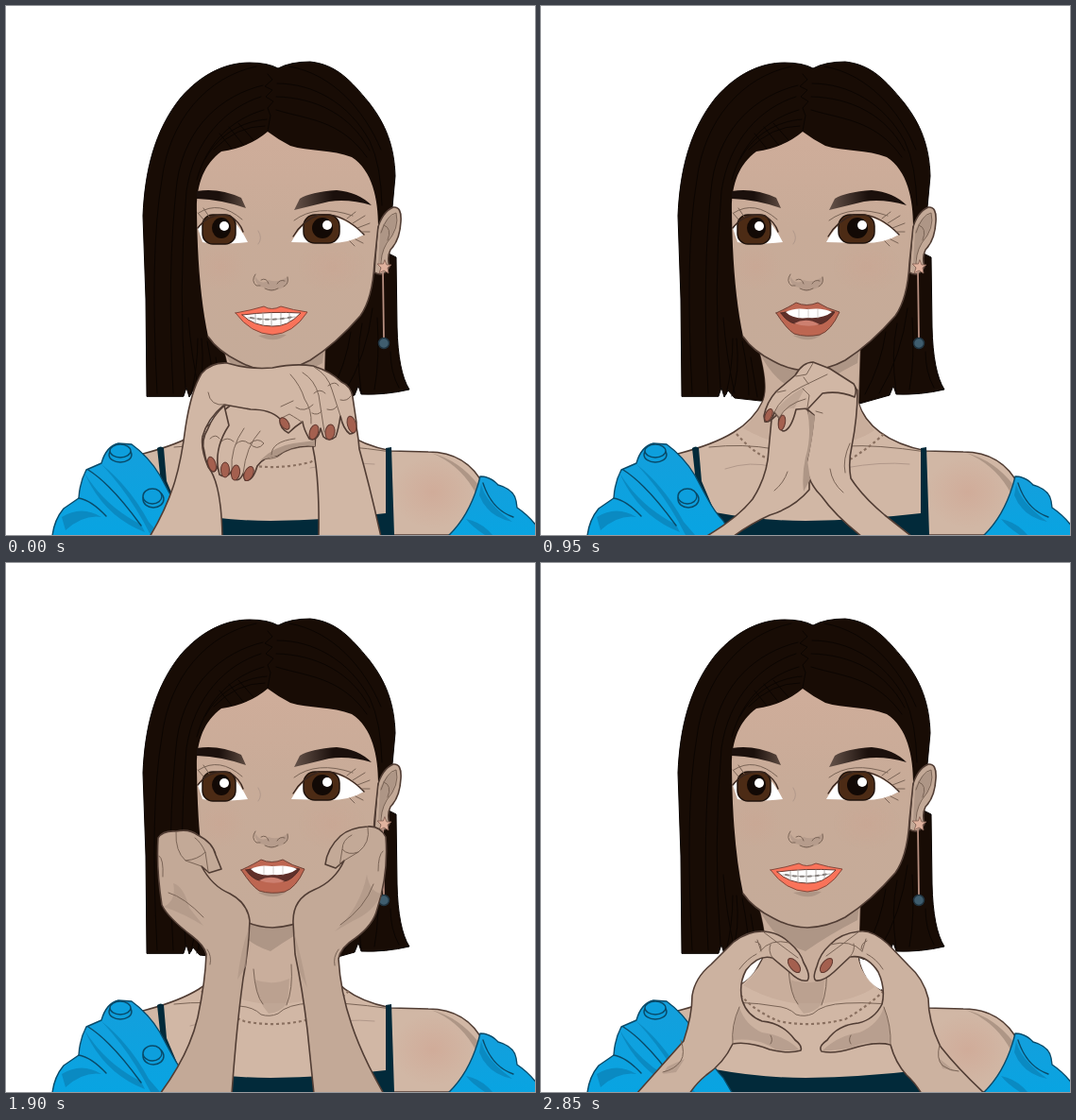
These frames come from a looping animation (560x560 px, 3800 ms). An HTML page:

```html
<!DOCTYPE html>
<html lang="en">
<head>
<meta charset="utf-8">
<title>Portrait poses</title>
<style>
html, body { margin: 0; width: 100%; height: 100%; overflow: hidden; background: #fff; }
svg { display: block; width: 100vw; height: 100vh; }
.pose { animation: quarter 3.8s step-end infinite; }
.mouth { animation: half 3.8s step-end infinite; }
.p2 { animation-delay: -2.85s; }
.p3 { animation-delay: -1.9s; }
.p4, .smile { animation-delay: -.95s; }
.talk { animation-delay: -2.85s; }
@keyframes quarter { 0% { visibility: visible } 25%, 100% { visibility: hidden } }
@keyframes half { 0% { visibility: visible } 50%, 100% { visibility: hidden } }
path, circle, ellipse { stroke-linejoin: round; stroke-linecap: round; }
.ink { stroke: #513d34; stroke-width: 1.6; }
.fine { fill: none; stroke: #7a6456; stroke-width: 1; }
.soft { fill: none; stroke: #b1988a; stroke-width: 1; }
.shade { fill: #ae9686; }
.light { fill: #d1b7a5; }
.mid { fill: #c3a997; }
.warm { fill: #ccb2a0; }
.nail { fill: #a4604f; stroke: #60382f; stroke-width: 1; }
.chain { fill: none; stroke: #8a7060; stroke-width: 2.2; stroke-dasharray: 3 3; stroke-linecap: butt; }
.strand { fill: none; stroke: #0b0502; stroke-width: 1; }
.cloth { stroke: #094a69; stroke-width: 1.4; }
.fold { fill: #0a8ac2; }
.top { fill: #022a3a; }
</style>
</head>
<body>
<svg viewBox="0 0 560 560">
<defs>
  <linearGradient id="skin" x2="0" y2="1">
    <stop offset="0" stop-color="#cfad9a"/><stop offset=".4" stop-color="#c8ab98"/><stop offset="1" stop-color="#c5ab99"/>
  </linearGradient>
  <linearGradient id="blue" x2="0" y2="1">
    <stop offset="0" stop-color="#149fdc"/><stop offset="1" stop-color="#08a4e2"/>
  </linearGradient>
  <linearGradient id="browL"><stop offset=".45" stop-color="#1b100c"/><stop offset="1" stop-color="#5d4a40"/></linearGradient>
  <linearGradient id="browR"><stop offset="0" stop-color="#66534a"/><stop offset=".5" stop-color="#1b100c"/></linearGradient>
  <radialGradient id="blush"><stop offset="0" stop-color="#cf9b88" stop-opacity=".4"/><stop offset="1" stop-color="#cf9b88" stop-opacity="0"/></radialGradient>
</defs>

<!-- hair -->
<path fill="#180c05" stroke="#0b0502" d="M149 413L148 310L145 222C147 175 157 132 185 97C207 72 232 60 258 60Q277 60 288 66Q301 59 322 59C350 62 365 79 384 102C402 125 411 148 412 180L409 213L405 262L413 266L414 340Q415 387 427 406Q402 412 376 411L373 402L369 412L337 421L232 418L205 415L198 407L194 414L191 404L188 413Z"/>
<g class="strand">
  <path d="M277 72l5 6-8 7 8 4-7 7 8 5-6 7 3 8-3 16"/>
  <path d="M272 84C230 94 190 126 181 186Q170 280 177 410M270 96C232 108 199 142 191 196Q182 300 190 404"/>
  <path d="M265 64C213 75 173 120 165 184Q152 260 160 410M273 110C241 119 213 143 202 184"/>
  <path d="M287 82C326 82 363 103 385 143Q397 168 398 211M286 96C328 97 365 115 385 153M286 110C318 120 354 120 382 160"/>
  <path d="M300 64C346 72 379 110 397 152M276 120C250 122 225 136 211 162M274 127Q244 127 220 152M236 128l16 20M246 124l16 18M226 135l13 16"/>
  <path d="M203 352Q203 382 196 411M207 352Q211 388 202 413M213 355Q220 390 220 412M193 330Q196 370 205 410M222 372l7 42"/>
  <path d="M388 320Q382 370 358 410M393 330Q396 374 390 406M365 345Q360 380 343 411M407 366Q407 388 416 404M377 336Q370 368 376 408"/>
</g>

<!-- neck and shoulders -->
<path class="light ink" d="M229 358C238 385 240 405 235 418C222 445 195 461 145 474L170 560H490L506 508C494 484 475 472 447 472L408 471C366 463 343 443 336 420L338 354Z"/>
<ellipse cx="452" cy="515" rx="44" ry="38" fill="url(#blush)"/>
<path fill="#c9ae9c" d="M230 360C238 390 240 407 235 419Q228 436 214 447Q240 462 268 466H300Q335 462 353 449Q340 437 336 420L338 355Z"/>
<path class="shade" d="M230 362Q249 381 280 387Q312 384 337 361L335 378Q304 394 280 411Q252 403 235 374Z"/>
<path class="shade" opacity=".5" d="M263 441Q266 464 278 477Q289 477 298 466L300 440Q282 448 263 441Z"/>
<path class="shade" d="M450 473Q480 481 500 507L498 517Q482 486 450 473Z"/>
<path class="fine" d="M178 467Q214 463 247 469Q262 470 270 478Q279 481 288 477Q298 467 323 466Q354 464 408 472M262 430q2 28 10 37M302 425q2 26-5 43"/>
<path class="soft" d="M195 490Q222 481 246 488M322 489Q360 482 390 485"/>
<path class="chain" d="M207 453Q226 475 252 485Q285 492 322 483Q345 470 364 452"/>
<path class="top" d="M160 468Q164 465 167 468L170 503L184 536Q232 545 280 545Q342 544 402 537L402 468L408 467L411 560H170Z"/>

<!-- jacket -->
<g class="cloth" fill="url(#blue)">
  <path d="M49 561Q51 544 61 532L77 521Q78 504 85 491L101 484Q106 466 119 463L133 464Q151 477 163 497L176 521Q184 536 193 545L203 562Z"/>
  <path d="M502 498Q513 498 521 507Q538 512 540 524L541 531Q553 539 562 551V562H467Q492 539 502 498Z"/>
</g>
<g class="fold">
  <path d="M83 494Q104 529 143 549L147 557Q103 540 83 494Z"/>
  <path d="M101 485Q131 509 151 546L163 560H153Q132 518 101 485Z"/>
  <path d="M59 541Q80 528 101 541Q82 538 63 555ZM503 506Q507 525 536 546Q510 541 501 518ZM487 543Q503 546 515 560H507Q493 551 487 543Z"/>
</g>
<g class="cloth" fill="#0d9fdd">
  <path d="M87 491Q111 506 143 550M505 505Q514 533 537 541M77 521Q90 523 106 540" fill="none"/>
  <ellipse cx="121" cy="475" rx="12" ry="8"/><ellipse cx="121" cy="471" rx="11" ry="7"/>
  <ellipse cx="156" cy="522" rx="11" ry="9"/><ellipse cx="155" cy="519" rx="10" ry="8"/>
</g>

<!-- ear -->
<path class="mid ink" d="M393 237Q398 218 410 213Q419 212 418 228Q417 248 407 258Q403 266 406 276Q400 288 390 282Z"/>
<path class="shade" d="M396 238Q403 222 413 220Q415 238 402 251L394 276Z"/>
<path class="fine" d="M397 240Q403 221 413 219Q417 235 403 251Q396 263 397 278M400 232q9 3 4 16"/>

<!-- face -->
<path fill="url(#skin)" d="M277 133Q257 150 228 154C209 168 201 190 202 219Q203 299 214 350Q224 365 246 376Q264 386 282 386Q304 385 322 375Q350 357 375 328Q388 310 390 272L394 233C394 205 388 174 366 160C346 152 320 154 301 148Q289 142 277 133Z"/>
<path fill="none" class="ink" d="M214 350Q224 365 246 376Q264 386 282 386Q304 385 322 375Q350 357 375 328Q388 310 390 272L394 233"/>
<g fill="url(#blush)" opacity=".5">
  <ellipse cx="227" cy="276" rx="27" ry="25"/><ellipse cx="345" cy="276" rx="36" ry="27"/>
</g>
<path class="shade" d="M267 349Q281 346 297 348Q284 358 267 349Z"/>
<path fill="url(#browL)" d="M202 196Q225 192 249 203L254 214Q229 205 202 204Z"/>
<path fill="url(#browR)" d="M305 216L311 204Q322 197 350 195Q373 197 387 211Q363 204 342 207Z"/>

<!-- eyes -->
<path fill="#fff" d="M203 235Q217 219 236 223Q247 232 256 250Q225 253 208 250ZM302 250Q314 228 330 222Q354 219 379 242Q364 251 342 251Z"/>
<g stroke="#20130c" stroke-width="1.5" fill="#4c2b15">
  <rect x="208" y="221" width="35" height="31" rx="11"/>
  <rect x="315" y="221" width="38" height="30" rx="12"/>
</g>
<g fill="#120905">
  <ellipse cx="228" cy="235" rx="10" ry="11"/><ellipse cx="335" cy="235" rx="11" ry="11"/>
</g>
<circle cx="231" cy="233" r="5" fill="#fff"/><circle cx="340" cy="232" r="5" fill="#fff"/>
<path fill="none" stroke="#38251d" stroke-width="1.4" d="M203 235Q216 218 237 222Q248 229 251 239M304 244Q314 227 331 221Q356 218 379 242"/>
<path class="fine" d="M204 219Q226 205 250 226M305 227Q329 209 367 222M209 226l-6-7M215 223l-6-9M361 225l9-7M367 230l13-8M372 235l13-5M376 239l9 0M370 247l8 4M364 249l5 5"/>
<path class="soft" d="M267 238q5 8 0 14"/>

<!-- nose -->
<path class="shade" d="M263 285Q270 297 278 290Q288 294 299 286Q298 299 287 300Q280 305 274 298Q264 298 263 285Z" opacity=".65"/>
<path class="fine" d="M264 284Q259 291 265 296L269 296M270 290q6-3 8 4M287 294q3-5 8-3M298 287q2 7-4 10M274 299q7 4 14 0"/>

<g class="mouth smile">
  <path fill="#fa735a" stroke="#86483a" d="M243 325Q260 322 273 318Q281 323 291 318Q304 322 319 324Q304 347 282 348Q259 347 243 325Z"/>
  <path fill="#fff" stroke="#68372e" d="M250 327Q281 323 312 325Q298 340 282 339Q262 339 250 327Z"/>
  <path fill="none" stroke="#a7a3a0" stroke-width=".9" d="M256 330Q281 334 306 329M264 326v10M272 325v13M281 325v14M291 325v13M300 325v9"/>
  <path fill="none" stroke="#87817e" stroke-width="2" stroke-dasharray="3 5" d="M259 330Q281 334 304 329"/>
</g>
<g class="mouth talk">
  <path fill="#bd6651" stroke="#6f4034" d="M249 325Q264 318 270 314Q281 319 293 314Q302 320 316 324Q307 344 295 348Q281 351 268 347Q260 342 249 325Z"/>
  <path fill="#5f302a" stroke="#502b25" d="M254 325Q281 318 311 324Q303 336 294 337Q281 333 268 336Q260 334 254 325Z"/>
  <path fill="#fff" d="M259 324Q268 319 282 321Q299 319 308 324Q299 331 283 330Q267 332 259 324Z"/>
  <path fill="none" stroke="#c8c1bd" stroke-width=".8" d="M273 321v9M283 321v9M293 321v9"/>
  <path fill="#cd8070" d="M268 336Q281 329 295 337Q282 341 268 336Z"/>
</g>

<!-- earring -->
<path fill="#e0b29e" stroke="#805f52" stroke-width=".8" d="M401 269l2 5 5 0-4 3 1 6-5-3-5 3 2-6-4-4h6Z"/>
<path d="M399 282l1 70" stroke="#b58d7e" stroke-width="1.8"/>
<circle cx="400" cy="357" r="5.5" fill="#3f5d6e" stroke="#20333f" stroke-width="1.5"/>

<!-- chin on stacked hands -->
<g class="pose p1">
  <path class="light ink" d="M397 562Q386 512 374 469Q371 429 355 401L322 425L325 468Q332 500 331 562Z"/>
  <path class="light ink" d="M240 421Q224 432 216 446Q205 459 210 472Q213 485 217 492Q222 494 224 487L226 496Q234 501 239 492L240 500Q247 505 251 495L253 502Q261 504 266 487Q273 477 287 476Q303 464 327 466L329 436Q286 416 240 421Z"/>
  <path class="shade" d="M269 481Q284 466 304 463L327 460V466Q305 463 287 476Z"/>
  <path class="fine" d="M224 487Q221 465 235 444M239 492Q237 468 252 447M251 495Q254 466 269 450M216 458q6-6 10 0M228 461q6-6 13 0M243 464q7-7 14-1M258 463q9-7 15 0-7 9-15 0M281 475q0-14 25-17"/>
  <g class="nail">
    <ellipse cx="218" cy="485" rx="4" ry="8" transform="rotate(-17 218 485)"/>
    <ellipse cx="232" cy="491" rx="4.5" ry="8"/>
    <ellipse cx="243" cy="494" rx="4.5" ry="8" transform="rotate(8 243 494)"/>
    <ellipse cx="257" cy="495" rx="4.5" ry="8" transform="rotate(24 257 495)"/>
  </g>
  <path class="light ink" d="M152 562C178 519 185 486 190 446Q196 407 207 389Q217 377 234 378Q257 385 282 383Q306 378 325 381Q344 387 355 398Q365 402 367 414L371 441Q371 453 364 453Q357 448 354 434Q352 448 349 456Q342 462 336 456L333 447Q330 462 321 458Q315 448 314 440Q306 445 299 452Q289 447 290 437Q280 427 259 427L231 422Q213 437 208 456Q206 469 214 488Q228 505 229 562Z"/>
  <path class="light ink" d="M231 423Q219 434 214 447Q206 460 210 472Q212 485 217 492Q222 494 224 487Q222 465 236 444Z"/>
  <path class="fine" d="M214 409Q216 424 232 422M216 458q6-6 10 0M326 382Q341 391 345 406L354 434M314 388Q327 396 331 412L337 451M301 390Q312 402 316 416Q324 428 323 442M290 437l10-5q10 6 14 9M341 402q8-6 11 0M326 410q6-6 12 0M307 425q9 6 18-3M324 431q6 3 10-2M340 427q7 2 10-3M354 417q7 2 11-4M304 418l-13 6"/>
  <g class="nail">
    <ellipse cx="218" cy="485" rx="4" ry="8" transform="rotate(-17 218 485)"/>
    <ellipse cx="295" cy="442" rx="4" ry="7" transform="rotate(-35 295 442)"/>
    <ellipse cx="326" cy="451" rx="4.5" ry="8" transform="rotate(18 326 451)"/>
    <ellipse cx="343" cy="451" rx="5" ry="8" transform="rotate(8 343 451)"/>
    <ellipse cx="366" cy="443" rx="4.5" ry="9" transform="rotate(-15 366 443)"/>
  </g>
</g>

<!-- clasped hands -->
<g class="pose p2">
  <path class="light ink" d="M174 562Q208 542 224 522Q240 497 241 470L244 438Q261 420 282 427Q291 452 284 481L284 512Q268 531 242 539Q220 549 203 562Z"/>
  <path class="light ink" d="M280 425Q285 406 303 388Q330 398 335 407Q335 436 329 466Q325 484 328 500Q340 519 364 539L393 562H340Q311 539 297 519Q281 503 281 484Q287 457 289 433Z"/>
  <path class="light ink" d="M236 434Q239 419 249 408L269 391Q277 377 288 377L306 384L331 400Q335 405 332 414Q316 407 298 410L283 426L270 427Q265 448 257 450Q250 449 252 436L247 430Q244 442 237 440Z"/>
  <path class="shade" d="M282 429l8 5Q287 464 282 481L285 501L278 514Q276 496 280 478Q287 454 282 429Z"/>
  <path class="shade" d="M247 430Q263 410 280 403L268 426Q257 424 252 437Z" opacity=".5"/>
  <path class="fine" d="M247 430Q254 414 276 403L303 390M252 436Q260 421 280 416M270 392l11-2 7-12M278 393l5 7M277 405l7 7-2 13M291 429l7 2M250 409l9-2M327 463q-8 17-5 31M247 513q10-8 14-20M306 490q2 15 14 25"/>
  <ellipse class="nail" cx="241" cy="433" rx="3.5" ry="7" transform="rotate(24 241 433)"/>
  <ellipse class="nail" cx="255" cy="441" rx="3.5" ry="8" transform="rotate(10 255 441)"/>
</g>

<!-- cheeks on hands -->
<g class="pose p3">
  <path class="mid ink" d="M163 562Q194 520 203 481Q211 443 212 414Q210 405 197 395Q171 375 165 362Q159 324 161 291Q166 283 180 284Q194 281 203 288Q219 296 222 309L228 324L215 328L207 321Q218 342 237 350Q256 360 258 379Q257 410 251 440Q244 491 239 562Z"/>
  <path class="mid ink" d="M400 562Q377 522 366 489Q354 454 352 419Q354 407 370 397Q389 383 393 366Q405 329 402 290Q396 278 383 279Q364 280 354 289Q340 302 338 319L349 323L358 315Q348 337 326 346Q303 356 304 381L306 414Q314 452 319 494L326 562Z"/>
  <path class="shade" d="M177 339Q188 342 194 365L209 384Q188 371 167 364Q181 357 177 339ZM382 330Q385 348 397 350Q390 369 367 379L348 390Q375 365 382 330ZM257 387L254 427L245 441Q249 407 257 387ZM305 391L311 433L319 450Q311 410 305 391Z" opacity=".65"/>
  <path class="fine" d="M180 285Q179 305 190 315Q203 314 211 306L214 326M190 315l17 6M162 310q5 3 4 22M211 306q-5-11-11-15M383 280Q386 296 373 306Q362 310 356 303L353 321M373 306l-15 9M399 305q-5 4-5 21M356 303q0-10 10-15M172 349q17 5 37 26M389 340q-9 25-35 43M213 409q5 7 3 16M352 409q-6 8-4 17"/>
</g>

<!-- finger heart -->
<g class="pose p4">
  <path fill="#fff" d="M212 445Q213 424 232 418Q228 436 212 445ZM337 418Q357 425 360 452Q341 442 337 418Z"/>
  <path class="warm ink" d="M101 562Q134 525 151 506Q160 479 160 458Q163 439 180 425L204 401Q220 389 236 390Q252 391 263 402Q275 412 278 423Q286 437 282 442Q274 444 263 433L245 418Q230 414 217 431Q209 446 213 463Q218 479 234 485Q256 487 269 505Q277 511 275 516Q263 520 242 515Q219 506 203 509Q193 530 175 542Q164 551 157 562Z"/>
  <path class="warm ink" d="M470 562Q441 535 423 512Q410 486 410 461Q405 440 389 426L367 403Q350 388 337 390Q317 392 306 404Q295 414 292 427Q287 440 291 442Q299 443 310 433L327 417Q345 414 357 433Q365 450 361 467Q353 483 336 487Q314 489 303 505Q293 512 297 517Q310 520 329 514Q354 506 370 510Q375 529 387 542Q396 550 403 562Z"/>
  <path class="shade" d="M210 470Q203 488 203 505Q231 502 250 516L274 516Q259 500 234 497Q216 489 210 470ZM363 470Q370 490 370 508Q343 505 327 514L297 517Q314 500 337 497Q357 489 363 470ZM134 533l18-8-9 14-14 2ZM421 524l17 14-13-3Z" opacity=".65"/>
  <path class="fine" d="M263 402Q243 397 232 411M245 418q-5-8-2-14M227 401q6 0 6 8M229 399l4 12M210 430q8-11 18-16M236 391q13 10 36 27M306 404Q328 398 340 411M327 417q6-7 4-14M345 400q-6 2-6 9M344 398l-4 13M362 430q-7-11-17-16M337 390q-13 10-35 26M210 470Q201 490 203 509M363 470Q371 490 370 510M148 505q5 14 0 22-6 9-19 12M422 510q-4 15 3 22 8 6 17 6M243 500q3 5 0 9M328 500q-3 5 0 9"/>
  <ellipse class="nail" cx="268" cy="426" rx="4.5" ry="9" transform="rotate(-39 268 426)"/>
  <ellipse class="nail" cx="302" cy="426" rx="4.5" ry="9" transform="rotate(39 302 426)"/>
</g>
</svg>
</body>
</html>
```
